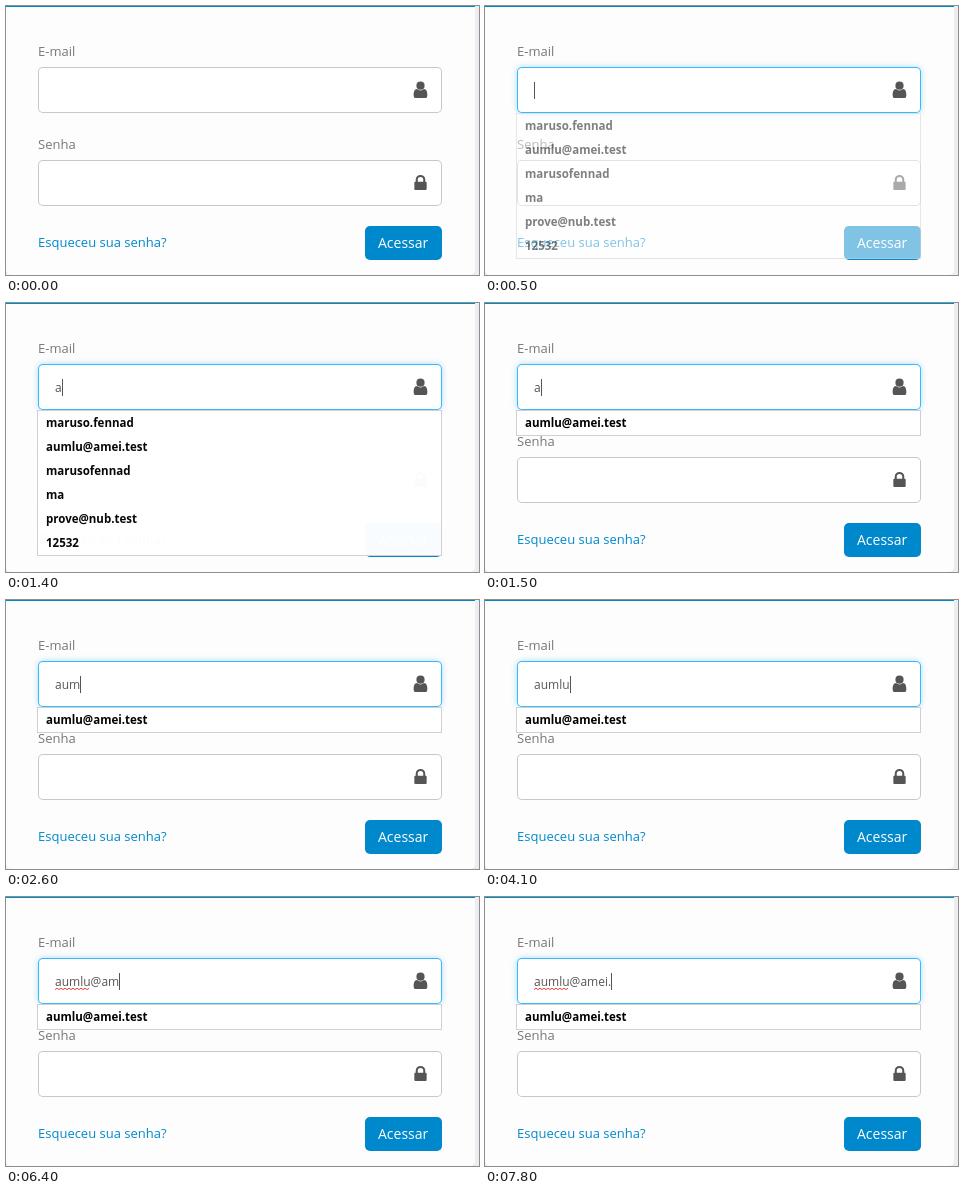
Recreate the animation shown at these times as an HTML page with a canvas. Size 473 by 269 pixels, loop 8 s.

```html
<!DOCTYPE html>
<html lang="pt">
<head>
<meta charset="utf-8">
<title>Login</title>
<style>
  html, body { margin: 0; width: 100%; height: 100%; overflow: hidden; background: #ecedf0; }
  canvas { display: block; }
</style>
</head>
<body>
<canvas id="stage" width="473" height="269"></canvas>
<script>
const ctx = document.getElementById('stage').getContext('2d');
const LOOP = 8000, FOCUS = 500, BLINK = 500, DELAY = 100;
const KEY_TIMES = [1400, 1900, 2600, 2900, 3100, 4500, 6200, 6400, 6600, 6700, 7800];
const BLUE = '#0088cc', GREY = '#777777', DARK = '#555555', PAPER = '#fdfdfd';
const EMAIL = 'aumlu@amei.test';
const HISTORY = ['maruso.fennad', EMAIL, 'marusofennad', 'ma', 'prove@nub.test', '12532'];
const LEFT = 32, WIDTH = 404, TEXT_X = 49, ICON_X = 414.5, ICON_SCALE = 0.0107;

function label(text, x, y, size, color, weight = 400) {
  ctx.font = `${weight} ${size}px "Open Sans", sans-serif`;
  ctx.fillStyle = color;
  ctx.fillText(text, x, y);
}

function box(x, y, w, h, radius, fill) {
  ctx.beginPath();
  ctx.roundRect(x, y, w, h, radius);
  ctx.fillStyle = fill;
  ctx.fill();
}

function field(y, focused) {
  ctx.save();
  if (focused) {
    ctx.shadowColor = 'rgba(0, 136, 204, 0.3)';
    ctx.shadowBlur = 6;
  }
  box(LEFT, y, WIDTH, 46, 5, focused ? '#33bbff' : '#c8c8c8');
  ctx.restore();
  box(LEFT + 1, y + 1, WIDTH - 2, 44, 4, '#ffffff');
}

// Icons are drawn in glyph units: centred on x, y upwards from the bottom edge.
function icon(bottom, paint) {
  ctx.save();
  ctx.translate(ICON_X, bottom);
  ctx.scale(ICON_SCALE, -ICON_SCALE);
  ctx.fillStyle = ctx.strokeStyle = DARK;
  paint();
  ctx.restore();
}

function user() {
  ctx.beginPath();
  ctx.arc(0, 1152, 384, 0, Math.PI * 2);
  ctx.fill();
  ctx.beginPath();
  ctx.moveTo(0, 704);
  for (const side of [1, -1]) {
    ctx.moveTo(0, 704);
    ctx.quadraticCurveTo(182 * side, 704, 313 * side, 832);
    ctx.bezierCurveTo(590 * side, 832, 640 * side, 520, 640 * side, 265);
    ctx.quadraticCurveTo(640 * side, 0, 427 * side, 0);
    ctx.lineTo(0, 0);
  }
  ctx.fill();
}

function lock() {
  box(-576, 0, 1152, 768, 96, DARK);
  ctx.lineWidth = 192;
  ctx.beginPath();
  ctx.moveTo(352, 700);
  ctx.lineTo(352, 960);
  ctx.arc(0, 960, 352, 0, Math.PI);
  ctx.lineTo(-352, 700);
  ctx.stroke();
}

function form(focused) {
  ctx.fillStyle = '#ecedf0';
  ctx.fillRect(0, 0, 473, 269);
  box(0, 0, 469, 269, [0, 0, 5, 5], PAPER);
  ctx.fillStyle = BLUE;
  ctx.fillRect(0, 0, 469, 1);

  label('E-mail', LEFT, 50, 13, GREY);
  field(61, focused);
  icon(92, user);

  label('Senha', LEFT, 143, 13, GREY);
  field(154, false);
  icon(184, lock);

  label('Esqueceu sua senha?', LEFT, 241, 13, BLUE);
  box(359, 220, 77, 34, 5, BLUE);
  label('Acessar', 372, 242, 14, '#ffffff');
}

function suggestions(items, alpha) {
  const height = items.length * 24 + 2;
  ctx.save();
  ctx.globalAlpha = alpha;
  ctx.fillStyle = '#ffffff';
  ctx.fillRect(31, 107, 405, height);
  ctx.strokeStyle = '#d0d0d0';
  ctx.lineWidth = 1;
  ctx.strokeRect(31.5, 107.5, 404, height - 1);
  items.forEach((item, i) => label(item, 40, 124 + i * 24, 11.5, '#000000', 700));
  ctx.restore();
}

function squiggle(width) {
  ctx.strokeStyle = '#e8413c';
  ctx.lineWidth = 1;
  ctx.beginPath();
  for (let dx = 0; dx <= width; dx += 2) {
    ctx.lineTo(TEXT_X + dx, dx % 4 ? 91.2 : 92.6);
  }
  ctx.stroke();
}

function entry(t) {
  const count = KEY_TIMES.filter(time => time <= t).length;
  const typed = EMAIL.slice(0, count);
  label(typed, TEXT_X, 89, 12, DARK);

  // The spelling mark appears shortly after the first word is complete.
  const word = EMAIL.split('@')[0];
  if (t >= KEY_TIMES[word.length] + DELAY) squiggle(ctx.measureText(word).width);

  // Each keystroke restarts the caret's blink.
  const lastInput = count ? KEY_TIMES[count - 1] : FOCUS;
  if (Math.floor((t - lastInput) / BLINK) % 2 === 0) {
    ctx.fillStyle = DARK;
    ctx.fillRect(Math.round(TEXT_X + ctx.measureText(typed).width), 76, 1, 17);
  }
}

function draw(t) {
  const focused = t >= FOCUS;
  form(focused);
  if (!focused) return;
  if (t >= KEY_TIMES[0] + DELAY) suggestions([EMAIL], 1);
  else suggestions(HISTORY, t < FOCUS + DELAY ? 0.5 : 0.975);
  entry(t);
}

const start = performance.now();
function tick() {
  draw((performance.now() - start) % LOOP);
  requestAnimationFrame(tick);
}
tick();
</script>
</body>
</html>
```
